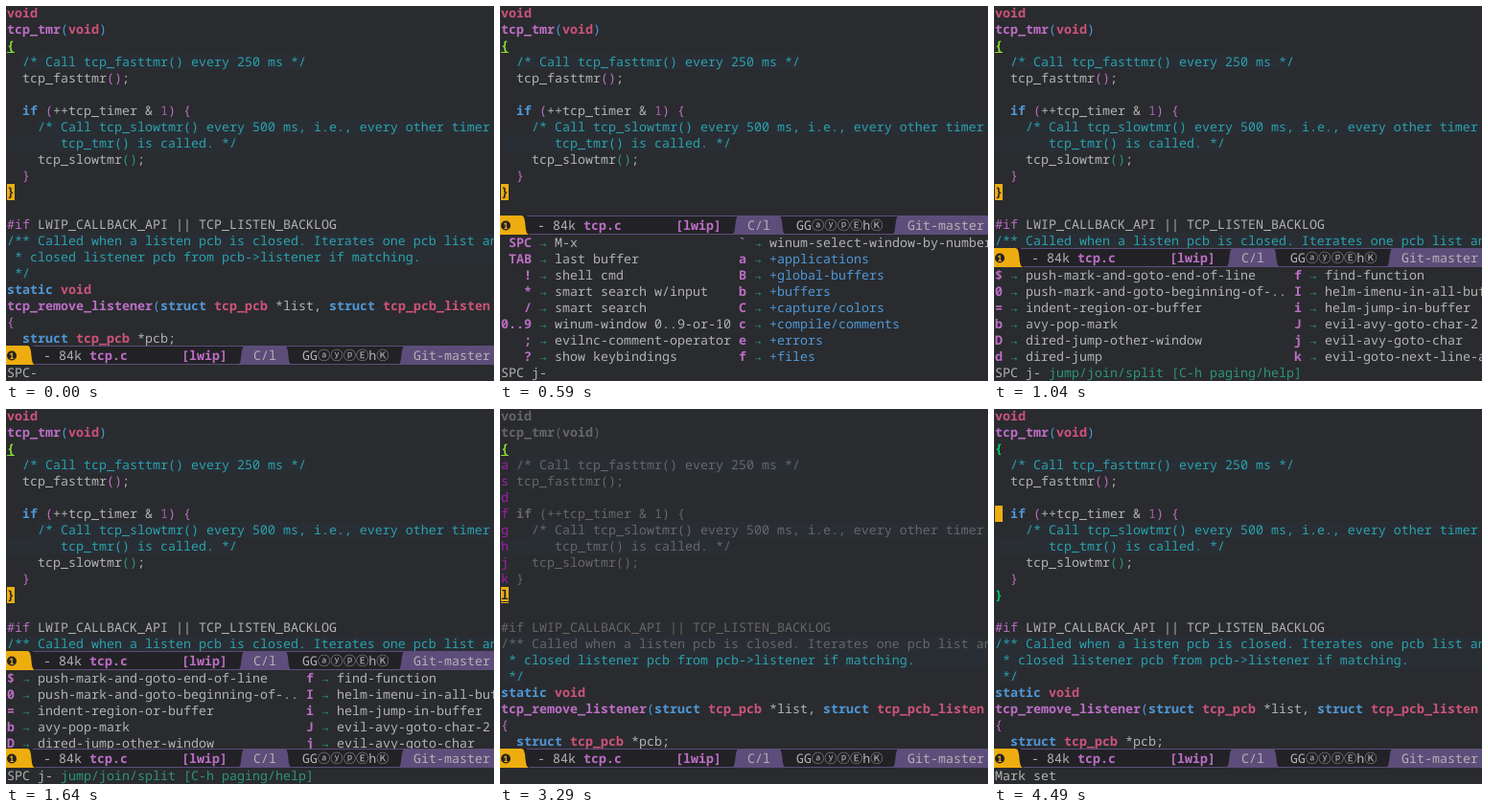
Recreate the animation shown at these times as an HTML page. Size 509x392 px, loop 6190 ms.

```html
<!DOCTYPE html>
<html lang="en">
<head>
<meta charset="utf-8">
<title>Jump to line</title>
<style>
html, body { margin: 0; width: 100%; height: 100%; overflow: hidden; background: #292b2e; }
svg { display: block; width: 509px; height: 392px; }
text {
  font: 13.3333px "Noto Sans Mono", "DejaVu Sans Mono", monospace;
  white-space: pre; fill: #b2b2b2; text-rendering: geometricPrecision;
}
.keyword, .type, .func, .key, .pair, .inside, .bold { font-weight: bold; }
.keyword, .group, .depth1, .lead { fill: #4f97d7; }
.type { fill: #ce537a; }
.func, .key, .builtin, .depth2 { fill: #bc6ec5; }
.depth3, .note { fill: #2d9574; }
.number { fill: #a45bad; }
.comment { fill: #2aa1ae; }
.pair { fill: #86dc2f; }
.inside { fill: #00cd66; }
.label { fill: #a31db1; }
.dim { fill: #666; }
.dark { fill: #292b2e; }
.circled { font-family: "Noto Sans CJK JP", "Noto Sans CJK SC", "Noto Sans CJK", "DejaVu Sans", sans-serif; text-anchor: middle; }
.badge { font-size: 9px; font-weight: bold; fill: #eead0e; text-anchor: middle; }
</style>
</head>
<body>
<svg id="stage" viewBox="0 0 509 392" xml:space="preserve"></svg>
<script>
const LOOP = 6190, WIDTH = 509, CHAR = 8, LINE = 17, ASCENT = 13;
const BG = '#292b2e', COMMENT_BG = '#292e34', GOLD = '#eead0e', PURPLE = '#5d4d7a', BAR = '#222226';
const OPEN_ROW = 2, CLOSE_ROW = 11, DIM_ROWS = 15;

const source = `void
tcp_tmr(void)
{
  /* Call tcp_fasttmr() every 250 ms */
  tcp_fasttmr();

  if (++tcp_timer & 1) {
    /* Call tcp_slowtmr() every 500 ms, i.e., every other timer
       tcp_tmr() is called. */
    tcp_slowtmr();
  }
}

#if LWIP_CALLBACK_API || TCP_LISTEN_BACKLOG
/** Called when a listen pcb is closed. Iterates one pcb list and
 * closed listener pcb from pcb->listener if matching.
 */
static void
tcp_remove_listener(struct tcp_pcb *list, struct tcp_pcb_listen
{
  struct tcp_pcb *pcb;`.split('\n');

const left = x => 1 + x * CHAR;
const rowTop = row => row * LINE - 1;
const escape = s => s.replace(/&/g, '&amp;').replace(/</g, '&lt;');
const rect = (x, y, w, h, fill) => `<rect x="${x}" y="${y}" width="${w}" height="${h}" fill="${fill}"/>`;
const textAt = (x, y, str, cls = '') => `<text x="${x}" y="${y}" class="${cls}">${escape(str)}</text>`;
const cell = (col, top, str, cls) => textAt(left(col), top + ASCENT, str, cls);

const rules = [
  ['keyword', /^(if|struct|static)$/],
  ['type', /^(void|tcp_pcb\w*)$/],
  ['func', /^(tcp_tmr|tcp_remove_listener)$/],
  ['builtin', /^#if$/],
  ['number', /^\d+$/],
];

function highlight(lines) {
  let inComment = false, depth = 0;
  return lines.map(line => {
    const opens = /^\s*\/\*/.test(line);
    if (opens || inComment) {
      const col = opens ? line.search(/\S/) : 0;
      inComment = !line.includes('*/');
      return [{ col, str: line.slice(col), cls: 'comment', toEdge: inComment }];
    }
    return [...line.matchAll(/#?\w+|[(){}]|[^\s\w(){}]+/g)].map(({ 0: str, index: col }) => {
      let cls = (rules.find(([, re]) => re.test(str)) || [''])[0];
      if (/[({]/.test(str)) cls = 'depth' + ++depth;
      if (/[)}]/.test(str)) cls = 'depth' + depth--;
      return { col, str, cls };
    });
  });
}
const code = highlight(source);
const isBold = token => token && /keyword|type|func/.test(token.cls);
const underline = (col, row, color) => rect(left(col), rowTop(row) + ASCENT + 2, CHAR, 1, color);

// match: how the outer braces are marked; labels: row -> jump keys
function buffer({ cursor, match = 'pair', dim = false, labels = {} }) {
  let out = '';
  code.forEach((tokens, row) => {
    const top = rowTop(row), brace = row === OPEN_ROW || row === CLOSE_ROW;
    for (const { col, str, cls, toEdge } of tokens) {
      if (cls === 'comment')
        out += rect(left(col), top, toEdge ? WIDTH : str.length * CHAR, LINE, COMMENT_BG);
      let look = cls;
      if (brace) look = match;
      else if (dim && row < DIM_ROWS) look = 'dim' + (isBold({ cls }) ? ' bold' : '');
      out += cell(col, top, str, look);
      if (brace && match === 'pair') out += underline(col, row, '#86dc2f');
    }
    const label = labels[row] || '';
    if (label) out += rect(left(0), top, label.length * CHAR, LINE, BG);
    if (row === cursor) out += rect(left(0), top, CHAR, LINE, GOLD);
    const weight = brace || isBold(tokens[0]) && tokens[0].col === 0 ? ' bold' : '';
    [...label].forEach((ch, i) => {
      const lead = i < label.length - 1, onCursor = row === cursor && i === 0;
      out += cell(i, top, ch, (onCursor ? 'dark' : lead ? 'lead' : 'label') + weight);
      if (brace) out += underline(i, row, onCursor ? BG : lead ? '#4f97d7' : '#a31db1');
    });
    if (row === cursor && !label && brace) out += cell(0, top, '}', 'dark bold');
  });
  return out;
}

function modeline(top) {
  const base = 15;
  let out = rect(0, 0, WIDTH, 20, BAR)
    + `<path fill="${GOLD}" d="M0 0H22C29 0 24 20 31 20H0Z"/>`
    + `<path fill="${PURPLE}" d="M241 20C248 20 243 0 250 0H290C297 0 292 20 299 20ZM408 20C415 20 410 0 417 0H509V20Z"/>`
    + rect(28, 0, WIDTH, 1, PURPLE) + rect(31, 19, WIDTH, 1, PURPLE)
    + `<circle cx="6" cy="10.5" r="5" fill="${BAR}"/>` + textAt(6, 13.8, '1', 'badge')
    + textAt(39, base, '- 84k') + textAt(87, base, 'tcp.c', 'func')
    + textAt(183, base, '[lwip]', 'func') + textAt(258, base, 'C/l') + textAt(425, base, 'Git-master');
  let x = 309;
  for (const ch of 'GGⓐⓨⓟⒺhⓀ') {
    const wide = ch > 'z', w = wide ? 13.33 : CHAR;
    out += textAt(wide ? x + w / 2 : x, base, ch, wide ? 'circled' : '');
    x += w;
  }
  return `<g transform="translate(0 ${top})">${out}</g>`;
}

// Columns of "key description" lines; keys are right-aligned to keyWidth
function menu(top, columns) {
  let out = rect(0, top, WIDTH, 392 - top, BG);
  for (const { col, keyWidth, items } of columns)
    items.split('\n').forEach((item, i) => {
      const y = top + i * LINE, gap = item.indexOf(' ');
      const key = item.slice(0, gap), desc = item.slice(gap + 1), end = col + keyWidth;
      out += cell(end - key.length, y, key, 'key') + cell(end + 1, y, '→', 'note')
        + cell(end + 3, y, desc, desc[0] === '+' ? 'group' : '');
    });
  return out;
}

const echo = (str, note = '') => rect(0, 375, WIDTH, 17, BG)
  + cell(0, 375, str) + cell(str.length + 1, 375, note, 'note');

const rootMenu = menu(239, [
  { col: 0, keyWidth: 4, items: `SPC M-x
TAB last buffer
! shell cmd
* smart search w/input
/ smart search
0..9 winum-window 0..9-or-10
; evilnc-comment-operator
? show keybindings` },
  { col: 31, keyWidth: 1, items: `\` winum-select-window-by-number
a +applications
B +global-buffers
b +buffers
C +capture/colors
c +compile/comments
e +errors
f +files` },
]);
const jumpMenu = menu(273, [
  { col: 0, keyWidth: 1, items: `$ push-mark-and-goto-end-of-line
0 push-mark-and-goto-beginning-of-..
= indent-region-or-buffer
b avy-pop-mark
D dired-jump-other-window
d dired-jump` },
  { col: 39, keyWidth: 1, items: `f find-function
I helm-imenu-in-all-buffers
i helm-jump-in-buffer
J evil-avy-goto-char-2
j evil-avy-goto-char
k evil-goto-next-line-and-indent` },
]);

const keys = 'asdfghjkl';
const pairLabels = [...'jkl'].flatMap(a => [...keys].map(b => a + b)).slice(6);
const singleLabels = Object.fromEntries([...keys].map((k, i) => [i + 3, k]));

const plain = buffer({ cursor: CLOSE_ROW });
const bottomBar = modeline(355);
const root = plain + modeline(219) + rootMenu;
const jump = plain + modeline(253) + jumpMenu;
const jumpEcho = echo('SPC j-', 'jump/join/split [C-h paging/help]');

const steps = [
  [0, plain + bottomBar + echo('SPC-')],
  [440, root + echo('SPC-', 'Spacemacs root (1 of 2) [C-h paging/help]')],
  [590, root + echo('SPC j-')],
  [890, root + modeline(253) + jumpEcho],
  [1040, jump + jumpEcho],
  [1640, jump + bottomBar + jumpEcho],
  [1790, buffer({ cursor: CLOSE_ROW, dim: true, labels: pairLabels }) + bottomBar + echo('')],
  [3290, buffer({ cursor: CLOSE_ROW, dim: true, labels: singleLabels }) + bottomBar + echo('')],
  [4190, buffer({ cursor: 6 }) + bottomBar + echo('Mark set')],
  [4490, buffer({ cursor: 6, match: 'inside' }) + bottomBar + echo('Mark set')],
];

const stage = document.getElementById('stage');
stage.innerHTML = steps.map(([, svg]) => `<g display="none">${svg}</g>`).join('');
const scenes = [...stage.children];
const start = performance.now();
let shown = -1;

function draw() {
  const t = (performance.now() - start) % LOOP;
  const now = steps.filter(([at]) => at <= t).length - 1;
  if (now !== shown) {
    scenes.forEach((g, i) => g.setAttribute('display', i === now ? 'inline' : 'none'));
    shown = now;
  }
  requestAnimationFrame(draw);
}
draw();
</script>
</body>
</html>
```
